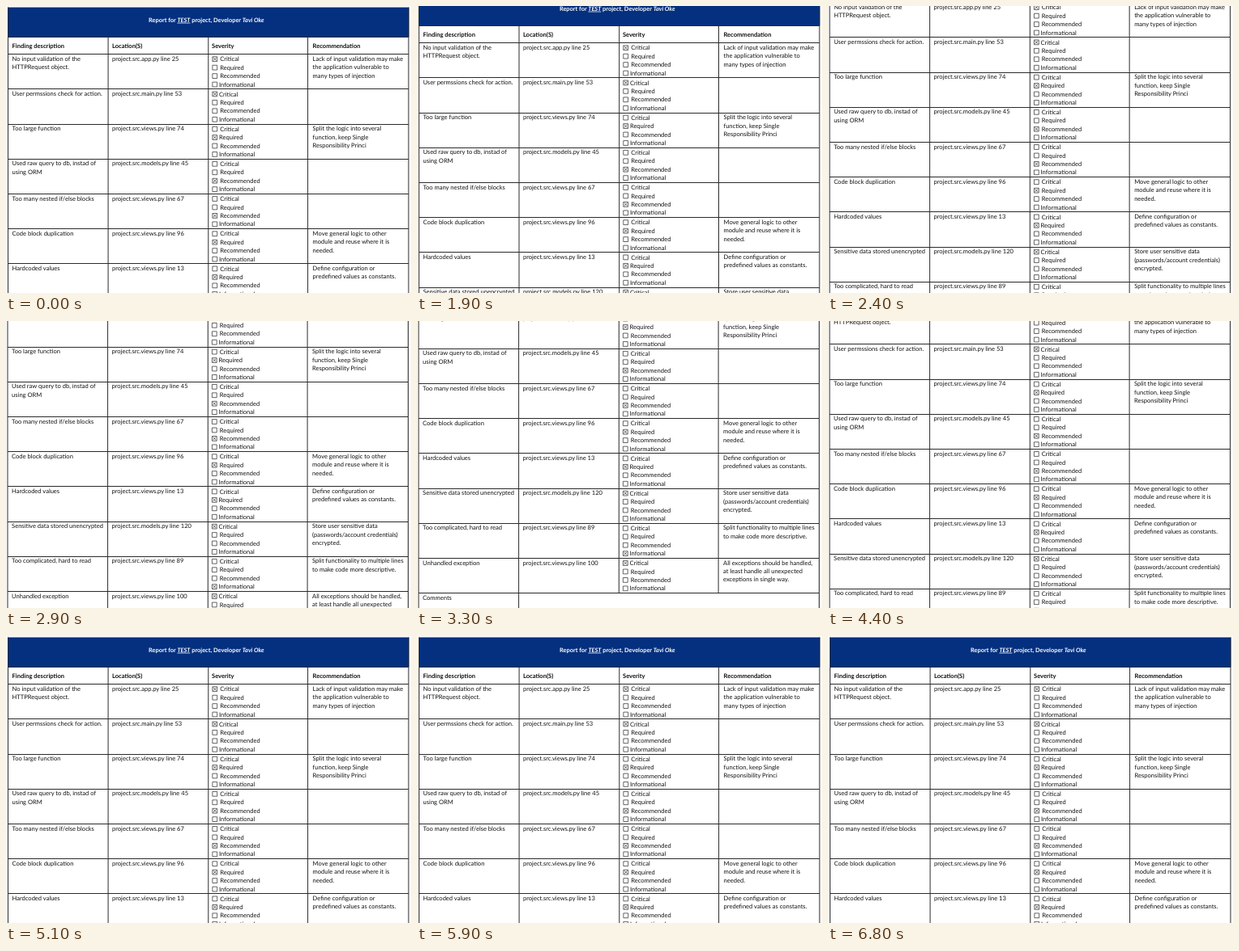
Recreate the animation shown at these times as an HTML page. Size 500 px wide and 355 px high, loop 7.1 s.

```html
<!DOCTYPE html>
<html lang="en">
<head>
<meta charset="utf-8">
<title>Code review report</title>
<style>
  html, body { margin: 0; width: 100%; height: 100%; overflow: hidden; background: #fff; }
  svg { display: block; width: 100vw; height: 100vh; }
  text { font: 7.55px Lato, "Open Sans", sans-serif; fill: #111; text-rendering: geometricPrecision; white-space: pre; }
  .head { font-weight: 700; }
  .title { font-size: 7.4px; font-weight: 700; fill: #fff; }
  .rule { stroke: #2b2b2b; stroke-width: 1; fill: none; }
  .box { stroke: #333; stroke-width: .75; fill: none; }
</style>
</head>
<body>
<svg viewBox="0 0 500 355"><g id="page"></g></svg>
<script>
const page = document.getElementById('page');
const LOOP = 7100, STEP = 100;
const LEFT = 2.5, RIGHT = 497, COLS = [126.1, 249.8, 372.6];
const TEXT_X = [7.6, 131, 254, 378.6];
const BAND_BOTTOM = 38.5, TOP = 59.2, ROW = 43.2, LINE = 10.45, END = 545;
const LEVELS = ['Critical', 'Required', 'Recommended', 'Informational'];

// finding, location, checked level, narrow gap after the checked box, advice
const ROWS = [
  ['No input validation of the|HTTPRequest object.', 'app.py line 25', 0, 0,
    'Lack of input validation may make|the application vulnerable to|many types of injection'],
  ['User permssions check for action.', 'main.py line 53', 0, 1, ''],
  ['Too large function', 'views.py line 74', 1, 1,
    'Split the logic into several|function, keep Single|Responsibility Princi'],
  ['Used raw query to db, instad of|using ORM', 'models.py line 45', 2, 0, ''],
  ['Too many nested if/else blocks', 'views.py line 67', 2, 0, ''],
  ['Code block duplication', 'views.py line 96', 1, 0,
    'Move general logic to other|module and reuse where it is|needed.'],
  ['Hardcoded values', 'views.py line 13', 1, 1,
    'Define configuration or|predefined values as constants.'],
  ['Sensitive data stored unencrypted', 'models.py line 120', 0, 1,
    'Store user sensitive data|(passwords/account credentials)|encrypted.'],
  ['Too complicated, hard to read', 'views.py line 89', 3, 1,
    'Split functionality to multiple lines|to make code more descriptive.'],
  ['Unhandled exception', 'views.py line 100', 0, 1,
    'All exceptions should be handled,|at least handle all unexpected|exceptions in single way.']
];

function add(tag, attrs, text) {
  const el = document.createElementNS('http://www.w3.org/2000/svg', tag);
  for (const key in attrs) el.setAttribute(key, attrs[key]);
  if (text) el.textContent = text;
  page.appendChild(el);
  return el;
}

function write(x, y, text, cls = '') {
  text.split('|').forEach((line, i) => add('text', { x, y: y + i * LINE, class: cls }, line));
}

function rule(d) {
  add('path', { d, class: 'rule' });
}

function checkbox(x, y, on) {
  const s = 5.8, cross = on ? 'm1 1l3.8 3.8m0-3.8l-3.8 3.8' : '';
  add('path', { d: `M${x} ${y}h${s}v${s}h${-s}z${cross}`, class: 'box' });
}

// Row borders sit on whole pixels so they stay crisp.
const rowTop = i => Math.round(TOP + i * ROW) + .5;

function build() {
  add('rect', { x: LEFT - .5, y: 1.6, width: RIGHT - LEFT + 1, height: BAND_BOTTOM - 1.6, fill: '#04307f' });
  const title = add('text', { x: 176, y: 19.7, class: 'title' });
  title.innerHTML = 'Report for <tspan font-style="italic" text-decoration="underline">TEST</tspan>' +
    ' project, Developer <tspan font-style="italic">Tavi Oke</tspan>';

  ['Finding description', 'Location(S)', 'Severity', 'Recommendation']
    .forEach((name, i) => write(TEXT_X[i], 52, name, 'head'));

  ROWS.forEach(([finding, place, level, tight, advice], i) => {
    const y = TOP + i * ROW, base = y + 8.5;
    write(TEXT_X[0], base, finding);
    write(TEXT_X[1], base, 'project.src.' + place);
    write(TEXT_X[3], base, advice);
    LEVELS.forEach((name, k) => {
      const on = k === level, ly = y + 9.1 + k * LINE;
      checkbox(254.9, ly - 5.5, on);
      write(k === 3 || (on && tight) ? 263 : 264.3, ly, name);
    });
  });

  const last = rowTop(ROWS.length);
  write(TEXT_X[0], TOP + ROWS.length * ROW + 8.5, 'Comments');
  for (let i = 0; i <= ROWS.length; i++) rule(`M${LEFT} ${rowTop(i)}H${RIGHT}`);
  rule(`M${LEFT} ${BAND_BOTTOM}H${RIGHT}`);
  COLS.forEach((x, i) => rule(`M${x} ${BAND_BOTTOM}V${i ? last : END}`));
  rule(`M${LEFT} 1.6V${END}M${RIGHT} 1.6V${END}`);
}

const mix = (a, b, p) => a + (b - a) * p;

function scrollAt(t) {
  if (t < 1900) return 0;
  if (t < 2900) return mix(14, 114, (t - 1900) / 1000);
  if (t < 3500) return mix(114, 176, (t - 2900) / 600);
  if (t < 3900) return 176;
  if (t < 4400) return mix(176, 74, (t - 3900) / 500);
  if (t < 5000) return 74 * (1 - (t - 4400) / 600) ** 1.7;
  return 0;
}

function draw(now) {
  const t = Math.floor((now % LOOP) / STEP) * STEP;
  const y = Math.round(scrollAt(t));
  const drift = .5 * Math.min(1, y / 70);
  page.setAttribute('transform', `translate(${-drift} ${-y})`);
}

build();
const start = performance.now();
function tick() {
  draw(performance.now() - start);
  requestAnimationFrame(tick);
}
tick();
</script>
</body>
</html>
```
